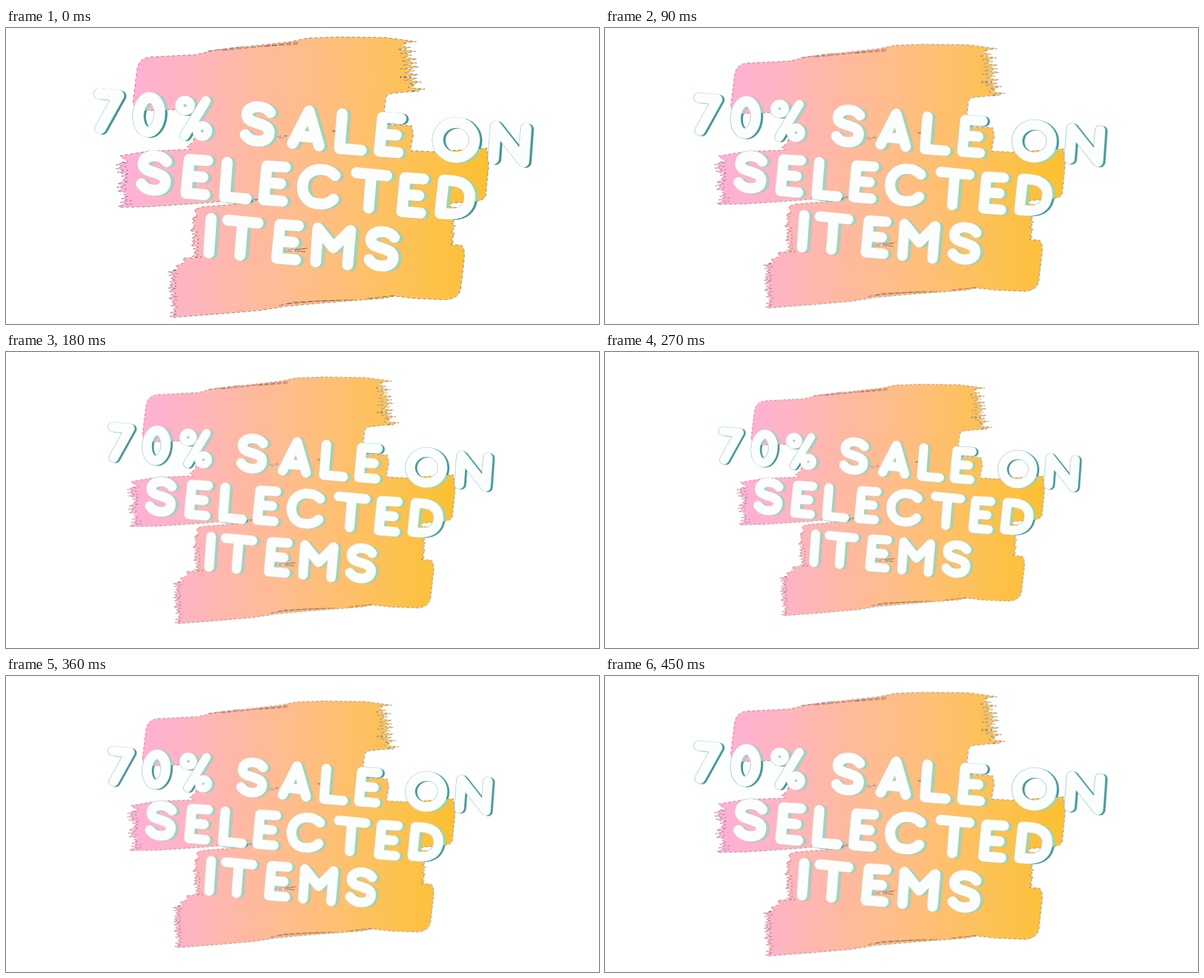
Recreate the animation shown at these times as an HTML page. Size 1000 px wide and 500 px high, loop 0.54 s.

```html
<!DOCTYPE html>
<html lang="en">
<head>
<meta charset="utf-8">
<title>70% sale on selected items</title>
<style>
html, body { margin: 0; width: 100%; height: 100%; overflow: hidden; background: #fff; }
svg { display: block; width: 100vw; height: 100vh; }
#banner { transform-origin: 0 0; animation: pulse 540ms step-end infinite; }
.words { fill: none; stroke-width: 18.5; stroke-linecap: round; stroke-linejoin: round; }
.hair { fill: none; stroke: #4d3f3a; stroke-width: .7; stroke-dasharray: 9 3; }
@keyframes pulse {
  0%, 100% { transform: none; }
  16.6667%, 83.3333% { transform: translate(10.7px, 13.3px) scale(.94); }
  33.3333%, 66.6667% { transform: translate(41.8px, 29px) scale(.879); }
  50% { transform: translate(69.7px, 42px) scale(.825); }
}
</style>
</head>
<body>
<svg viewBox="0 0 1000 500" role="img" aria-label="70% SALE ON SELECTED ITEMS">
  <defs>
    <linearGradient id="paint" gradientUnits="userSpaceOnUse" x1="182" y1="0" x2="814" y2="0">
      <stop offset="0" stop-color="#ffb0da"/>
      <stop offset=".18" stop-color="#ffb4c4"/>
      <stop offset=".35" stop-color="#ffb9a4"/>
      <stop offset=".5" stop-color="#ffbd8c"/>
      <stop offset=".67" stop-color="#ffc06c"/>
      <stop offset=".83" stop-color="#fdc24e"/>
      <stop offset="1" stop-color="#fcc030"/>
    </linearGradient>
    <path id="brush"/>
    <clipPath id="inBrush"><use href="#brush"/></clipPath>

    <path id="E" d="M31 2L0 0L-5.5 57L26 59.5M-2.7 28L23 30"/>
    <path id="L" d="M0 0L-4.5 58.5L32 61.5"/>
    <path id="T" d="M-25 -2.5L26 2.5M0 0L-4.5 57"/>
    <path id="S" transform="rotate(5)" d="M19 -21C14 -27 7 -29 0 -29C-12 -29 -20 -23 -20 -15C-20 -5 -11 -3 0 -1C12 2 20 4 20 14C20 24 12 29 0 29C-8 29 -15 26 -20 20"/>

    <g id="words">
      <path d="M157 111L190 114L159 170"/>
      <ellipse cx="241" cy="146.5" rx="18" ry="29" transform="rotate(5 241 146.5)"/>
      <path d="M337 123L301 182" stroke-width="16"/>
      <g stroke-width="14"><circle cx="302" cy="131" r="9.5"/><circle cx="331" cy="174" r="9.5"/></g>
      <use href="#S" x="425" y="162"/>
      <path d="M483 195L511 140L528 199M491 182L522 185"/>
      <use href="#L" x="567" y="145"/>
      <use href="#E" x="635" y="151"/>
      <ellipse cx="759" cy="189" rx="31" ry="29.5"/>
      <path d="M822 221L826 166L873 226L877 170"/>

      <use href="#S" x="250" y="245"/>
      <use href="#E" x="309" y="222"/>
      <use href="#L" x="373" y="227"/>
      <use href="#E" x="440" y="233"/>
      <path d="M555 249C548 242 540 239 532 239C514 238 501 250 500 266C499 284 511 297 528 297C538 298 546 295 552 289"/>
      <use href="#T" x="616" y="247"/>
      <use href="#E" x="673" y="253"/>
      <path d="M738 257L732 313L748 314C769 315 781 304 782 287C783 270 772 260 753 258Z"/>

      <path d="M346 322L342 380"/>
      <use href="#T" x="399" y="327"/>
      <use href="#E" x="462" y="332"/>
      <path d="M522 395L526 338L552 371L581 342L576 400"/>
      <use href="#S" x="634" y="373"/>
    </g>
  </defs>

  <g id="banner">
    <g class="words" stroke="#46999b">
      <use href="#words" x="4" y="1"/>
      <use href="#words" x="-.4"/>
    </g>
    <use href="#brush" fill="url(#paint)" stroke="#4d3f3a" stroke-width=".6" stroke-dasharray="5 4"/>
    <path class="hair" d="M340 39L402 31M365 38L430 31L494 24M436 31L492 27
      M460 469L486 463L560 460M474 466L530 461L585 459M610 457L655 452"/>
    <path class="hair" style="fill:#fff" d="M456 184L474 182L462 186ZM550 174L578 171L562 176Z
      M464 376L508 372L486 375L505 378ZM400 291L426 289L408 293Z"/>
    <g clip-path="url(#inBrush)">
      <use class="words" href="#words" x="6" y="1" stroke="#8fd6c6" opacity=".8"/>
    </g>
    <use class="words" href="#words" stroke="#fcfefe"/>
  </g>
</svg>
<script>
let seed = 7;
const rnd = () => (seed = seed * 16807 % 2147483647) / 2147483647;

// Torn bristles from one point to another; depth is signed, outward.
function bristles(x1, y1, x2, y2, count, depth) {
  let d = '';
  for (let i = 0; i < count; i++) {
    const at = (f, out) => {
      const t = (i + f) / count;
      d += `L${(x1 + (x2 - x1) * t + out * depth).toFixed(1)} ${(y1 + (y2 - y1) * t).toFixed(1)}`;
    };
    const tip = .5 + rnd() * .5;
    at(.05, tip * .8);
    at(.2, tip);
    at(.4, tip * .75);
    at(.55, tip * .7);
    at(.7, rnd() * .35);
    at(.85, tip * .6);
  }
  return d + `L${x2} ${y2}`;
}

document.getElementById('brush').setAttribute('d', [
  'M214 126L221 70Q224 51 243 49L300 46L320 45L350 38L400 32L480 23L508 17L560 15L640 16L692 23',
  bristles(656, 25, 664, 84, 9, 38),
  bristles(664, 84, 676, 108, 4, 34),
  'L648 111Q640 113 640 124L638 140L643 163L684 165L687 180L682 207L720 209L811 203',
  'L814 232L809 283Q806 292 790 293L752 296L746 301L762 304L754 326',
  bristles(750, 326, 750, 366, 6, 8),
  'L768 367Q774 372 773 388L767 440Q764 457 742 459L690 457L655 453L635 457L594 460L540 464L473 470L430 477L360 483L280 489',
  bristles(293, 488, 288, 440, 8, -17),
  bristles(288, 440, 292, 408, 6, -20),
  'L286 402L302 396L298 389L330 387',
  bristles(330, 387, 322, 318, 11, -17),
  'L318 306L332 302L410 296L425 290L410 289L330 296L240 302L192 303',
  bristles(214, 302, 206, 226, 12, -25),
  'L192 216L215 212L240 208L312 205L305 200L316 192L318 178L322 150L286 138L222 140Z'
].join(''));
</script>
</body>
</html>
```
